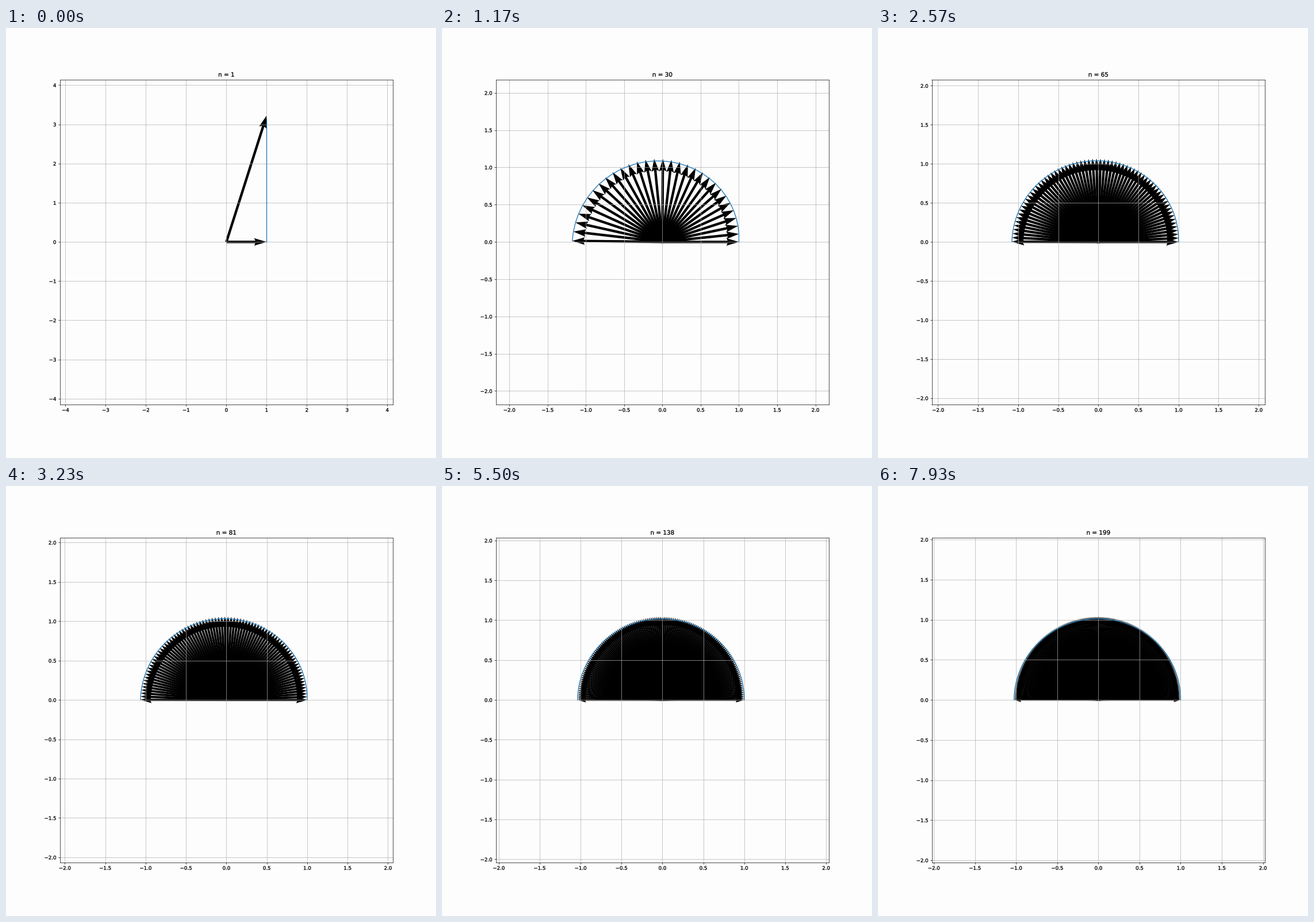
Recreate the animation shown at these times as a matplotlib script. Size 748 by 748 pixels, loop 7.96 s.

```python
import numpy as np
import matplotlib.pyplot as plt
from matplotlib.animation import FuncAnimation
from matplotlib.patheffects import Stroke

SIZE = 748
COUNT = 199
STEP_MS = 40
PAPER = "#fdfdfd"

plt.rcParams["font.family"] = "DejaVu Sans"
heavy = [Stroke(linewidth=0.35, foreground="black")]

fig = plt.figure(figsize=(12, 12), dpi=SIZE / 12, facecolor=PAPER)
ax = fig.add_axes([0.125, 0.125, 0.775, 0.755], facecolor=PAPER)
ax.grid(True)
curve, = ax.plot([], [], color="C0", linewidth=1.5)
title = ax.set_title("", fontsize=12, path_effects=heavy)
arrows = None


def powers(n):
    """Partial products of (1 + i*pi/n)**n, from k = 0 to n."""
    return (1 + 1j * np.pi / n) ** np.arange(n + 1)


def update(i):
    global arrows
    n = i + 1
    z = powers(n)
    if arrows is not None:
        arrows.remove()
    origin = np.zeros(n + 1)
    # Lengths follow the x scale, angles stay those of the raw vectors.
    arrows = ax.quiver(origin, origin, z.real, z.imag,
                       color="black", units="x", scale=1)
    curve.set_data(z.real, z.imag)

    lim = 1 + max(abs(z.real).max(), abs(z.imag).max())
    ax.set(xlim=(-lim, lim), ylim=(-lim, lim))
    title.set_text(f"n = {n}")
    for label in ax.get_xticklabels() + ax.get_yticklabels():
        label.set_path_effects(heavy)
    return arrows, curve, title


anim = FuncAnimation(fig, update, frames=COUNT, interval=STEP_MS,
                     repeat=True, repeat_delay=0, blit=False)
plt.show()
```
